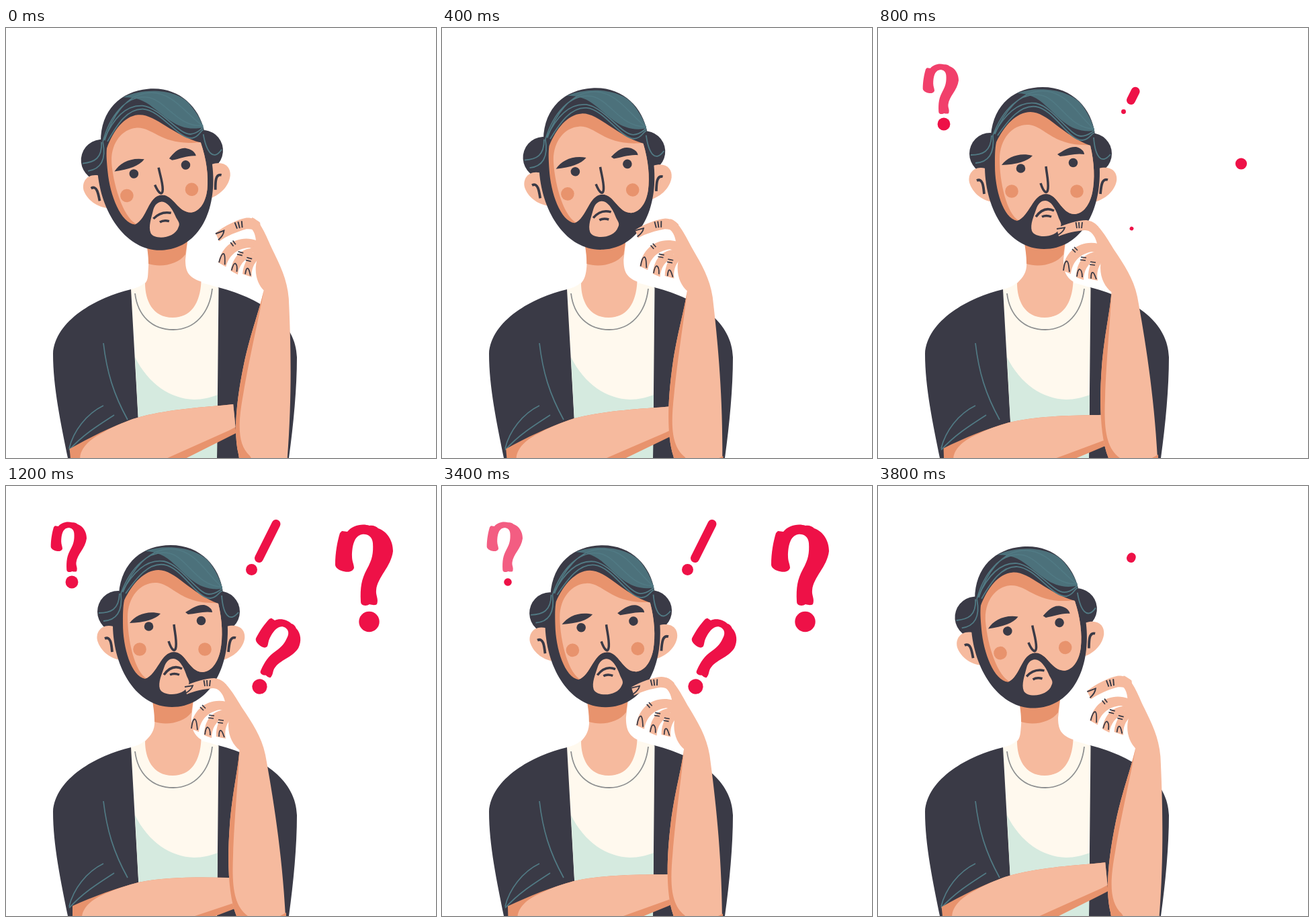
Recreate the animation shown at these times as an HTML page with a canvas. Size 640 by 640 pixels, loop 3.9 s.

```html
<!DOCTYPE html>
<html lang="en">
<head>
<meta charset="utf-8">
<title>Thinking man</title>
<style>
html, body { margin: 0; width: 100%; height: 100%; overflow: hidden; background: #fff; }
canvas { display: block; width: 640px; height: 640px; }
</style>
</head>
<body>
<canvas id="stage" width="640" height="640"></canvas>
<script>
const ctx = document.getElementById('stage').getContext('2d');
const LOOP = 3900, STEP = 100;
const DARK = '#3a3a46', SKIN = '#f6ba9e', SHADE = '#e8936d', CREAM = '#fff9ee',
      MINT = '#d5eadf', TEAL = '#4c717b', LINE = '#517a84', RED = '#ee1147';

const clamp = v => Math.min(1, Math.max(0, v));
const linear = (t, a, b) => clamp((t - a) / (b - a));
const smooth = (t, a, b) => { const u = linear(t, a, b); return u * u * (3 - 2 * u); };

// Rises from 0 to 1 over a..b, falls back over c..d.
const phase = (t, [a, b, c, d], ease = smooth) =>
  t < 2000 ? ease(t, a, b) : 1 - ease(t, c, d);

function fill(path, color) {
  ctx.fillStyle = color;
  ctx.fill(new Path2D(path));
}

function line(path, color, width, cap = 'butt') {
  ctx.strokeStyle = color;
  ctx.lineWidth = width;
  ctx.lineCap = cap;
  ctx.stroke(new Path2D(path));
}

function dot(x, y, r, color) {
  ctx.fillStyle = color;
  ctx.beginPath();
  ctx.arc(x, y, r, 0, Math.PI * 2);
  ctx.fill();
}

function group(draw) {
  ctx.save();
  draw();
  ctx.restore();
}

function turn(x, y, degrees, scale = 1) {
  ctx.translate(x, y);
  ctx.rotate(degrees * Math.PI / 180);
  ctx.scale(scale, scale);
  ctx.translate(-x, -y);
}

function drawBody() {
  fill('M186 389C135 401 73 435 70 485C70 535 82 590 92 640H421C428 590 433 535 433 490' +
       'C432 440 385 404 316 386Z', DARK);
  fill('M186 389C194 387 201 384 207 379H290C300 381 308 384 316.500 386.500L314 640H200Z', CREAM);
  fill('M192 490C212 530 245 552 280 553C293 553 304 550 315 546L314 640H200Z', MINT);
  line('M145 469C150 512 160 545 181 583M94 626C100 600 120 574 145 562' +
       'M94 628C114 606 136 592 161 576', LINE, 1.7);
}

function drawNeck(k) {
  const s = -9 * (1 - k);
  const left = 221 + s, right = 276 + s;
  fill(`M${left - 5} 310C${left} 330 ${left + 1} 345 ${left} 355C${left - 1} 368 212 374 207 380` +
       `C207 405 218 431 248 431C275 431 289 410 290.500 377.500` +
       `C${right + 4} 371 ${right} 362 ${right} 345L${right + 4} 310Z`, SKIN);
  fill(`M${left - 5} 310C${left - 1} 330 ${left} 340 ${left} 351` +
       `C${left + 19} 357 ${right - 11} 352 ${right} 337L${right + 4} 310Z`, SHADE);
  line('M192 395C196 428 217 449 249 449C281 449 303 424 307 388', '#8d8f90', 1.8);
}

const FACE = 'M176 170C188 145 206 125 227 125C252 125 275 160 316 175C322 200 323 225 319 245' +
  'C314 268 302 277 292 277C272 276 268 247 250 247C230 247 226 280 207 287' +
  'C186 283 174 240 174 205C174 190 174 180 176 170Z';

function drawHead(k) {
  const rest = 1 - k;
  turn(257, 445, -5.5 * rest);

  dot(167, 187, 31, DARK);
  dot(317.5, 187, 30.5, DARK);
  fill('M160 209C142 204 133 218 136 230C140 244 153 256 170 259Z', SKIN);
  fill('M328 209C348 204 357 215 355 228C352 243 338 255 322 259Z', SKIN);
  line('M147 227C156 223 157 236 158 247M342 226C333 223 332 236 331 247', DARK, 3.8);

  fill('M168 160C172 112 205 88 245 88C290 88 318 120 323 158C328 180 330 195 330 215' +
       'C330 277 300 329 247 329C195 329 160 272 159 208Z', DARK);
  fill(FACE, SHADE);
  group(() => {
    ctx.clip(new Path2D(FACE));
    fill('M212 288C192 280 181 230 181 195C181 165 200 144 222 144C248 144 258 177 318 174' +
         'L340 290Z', SKIN);
  });

  // Hair
  fill('M207 97C240 85 290 92 306 118C314 130 320 142 322 153C285 157 270 133 250 116' +
       'C237 103 224 98 207 97Z', TEAL);
  line('M171 160C185 122 212 94 243 100C270 106 284 150 322 150' +
       'M174 158C186 128 212 90 250 94C282 97 298 130 321 150', LINE, 1.6);
  line('M178 160C195 136 212 114 235 117C262 121 284 168 304 167C315 166 316 158 322 156' +
       'M173 157C188 130 208 108 235 112C262 118 284 160 302 161C313 161 316 156 322 153', LINE, 1.8);
  line('M169 160C168 184 156 189 138 189M171 160C174 187 164 200 145 201' +
       'M321 163C323 190 332 205 346 188', LINE, 1.8);

  // Features
  dot(199, 243, 9.8, SHADE);
  dot(296, 243, 9.8, SHADE);
  dot(212.5, 209 + 2.6 * rest, 6.8, DARK);
  dot(290.5, 200.5 + 5.5 * rest, 6.8, DARK);
  group(() => {
    ctx.translate(0, 1.5 * rest);
    fill('M184 204C193 192 210 185 230 190C222 199 206 203 184 204Z', DARK);
  });
  const drop = 6 * rest;
  fill(`M267 ${188 + drop}C275 ${183 + drop / 2} 285 176 ${295 + rest * 3} ${177 + drop}` +
       `C302 ${179 + drop} 307 ${183 + drop} 307 ${188 + drop}` +
       `C295 ${186 + drop} 283 ${190 + drop} 271 ${191 + drop}Z`, DARK);
  line('M250 206C251 217 254 228 253 239C252 248 247 246 242 231', DARK, 3.5);

  // Mouth
  fill('M249 257C257 257 264 268 268 280C270 287 275 291 271 297C264 314 233 313 229 302' +
       'C226 292 232 280 236 268C239 260 244 257 249 257Z', SKIN);
  line(`M235 281C243 ${270 + 4 * rest} 252 ${267 + 5 * rest} 262 ${272 + 3 * rest}`, DARK, 3.5);
  line(`M244 ${281 + drop}C248 ${279 + drop} 253 ${279 + drop} 258 ${281 + drop}`, DARK, 3.5);
}

function drawLowerArm(k) {
  ctx.translate(-4 * (1 - k), 0);
  turn(115, 630, -5.7 * (1 - k));
  const top = 'C130 611 165 598 197 590C235 582 285 582 331 583H348';
  fill(`M99 625${top}V626L338 630L270 656V670H99Z`, SHADE);
  fill('M113 645C112 628 128 614 152 605C168 598 182 594 197 590C235 582 285 582 331 583H348' +
       'V617L338 621L281 640L242 653V670H113Z', SKIN);
}

function drawRaisedArm(k) {
  const rest = 1 - k;
  turn(385, 660, 7.7 * rest);

  // Curled fingers
  fill('M328 321C300 315 277 333 275 361L287 366C289 350 298 337 318 333L332 336Z', SKIN);
  fill('M324 333C304 336 295 352 295 371L306 375C306 362 312 350 324 345Z', SKIN);
  fill('M332 334C318 342 312 358 313 373L327 376C325 365 327 356 334 347Z', SKIN);

  fill('M316 288C328 290 340 312 352 331C366 352 380 372 386 400C397 460 411 545 416 640' +
       'L417 670H352L343 640C331 610 329 560 333 505C337 455 345 425 347.500 393' +
       'C337 385 328 368 332 346L322 338L326 321C324 312 320 305 312 301Z', SKIN);
  fill('M347.500 393C345 425 337 455 333 505C329 560 331 610 343 640L352 670L385 670L360 640' +
       'C339 625 336 595 338 550C340 490 346 435 347.500 393Z', SHADE);
  fill('M417 635L406 641L417 645Z', SHADE);

  line('M276 361C277 352 279 347 281 347C284 348 284 356 285 363' +
       'M296 370C297 362 298 359 300 359C303 360 304 366 304 371' +
       'M317 373C317 366 318 363 320 364C322 365 323 369 325 374', DARK, 1.8);
  line('M289 329L294 334M292 326L297 331M302 341L310 342M301 345L309 346' +
       'M316 348L324 349M315 352L323 353', DARK, 1.7);

  // Index finger
  turn(322, 295, -19 * rest, 1 + 0.1 * rest);
  fill('M266 298C280 291 298 286 310 286C318 287 323 290 328 296L326 316C322 306 318 302 308 301' +
       'C295 302 280 305 269 310Z', SKIN);
  line('M266 299L278 297C277 301 273 305 268 308M294.500 289L296 298M299 289L299.500 298' +
       'M304 289L303 298', DARK, 1.8);
}

const HOOK = 'M500 67L508 68C515 59 530 55 541 59C546 58 551 60 554 63C568 68 576 82 576 97' +
  'C573 121 553 135 551 155C550 163 555 168 552 176C549 178 545 177 541 176C537 179 528 179 528 172' +
  'C527 151 529 139 537 124C545 110 547 100 546 85C545 75 538 71 530 72C518 74 515 90 515 105' +
  'C515 112 518 117 518 122C515 130 505 128 499 126C493 124 490 120 490 117C490 100 493 83 497 70Z';

const QUESTIONS = [
  { x: 98, y: 143, size: 0.62, tilt: 0, dot: [600, 790, 3300, 3560], hook: [640, 840, 3320, 3570] },
  { x: 540.5, y: 202, size: 1, tilt: 0, dot: [690, 885, 3530, 3790], hook: [820, 1070, 3550, 3800] },
  { x: 377.5, y: 298.5, size: 0.733, tilt: 26.5, dot: [750, 940, 3530, 3790], hook: [830, 1090, 3550, 3800] }
];

function drawQuestion(q, t) {
  ctx.translate(q.x, q.y);
  ctx.rotate(q.tilt * Math.PI / 180);
  ctx.scale(q.size, q.size);
  dot(0, 0, 15.2 * phase(t, q.dot, linear), RED);
  ctx.translate(-540.5, -202);
  ctx.globalAlpha = phase(t, q.hook, linear);
  fill(HOOK, RED);
}

function drawExclamation(t) {
  dot(365.5, 124.5, 8.5 * phase(t, [720, 915, 3520, 3780], linear), RED);
  const grow = phase(t, [700, 1000, 3550, 3830]);
  if (grow > 0) line(`M376.500 107.500L${376.5 + 25.5 * grow} ${107.5 - 51 * grow}`, RED, 13, 'round');
}

function render(t) {
  ctx.fillStyle = '#fff';
  ctx.fillRect(0, 0, 640, 640);
  const head = phase(t, [120, 800, 3130, 3980]);
  const hand = phase(t, [0, 780, 3100, 3850]);
  const elbow = phase(t, [150, 1200, 3210, 3830]);
  drawBody();
  drawNeck(head);
  group(() => drawHead(head));
  group(() => drawLowerArm(elbow));
  for (const q of QUESTIONS) group(() => drawQuestion(q, t));
  drawExclamation(t);
  group(() => drawRaisedArm(hand));
}

const start = performance.now();
function tick() {
  const t = (performance.now() - start) % LOOP;
  render(Math.floor(t / STEP) * STEP);
  requestAnimationFrame(tick);
}
tick();
</script>
</body>
</html>
```
